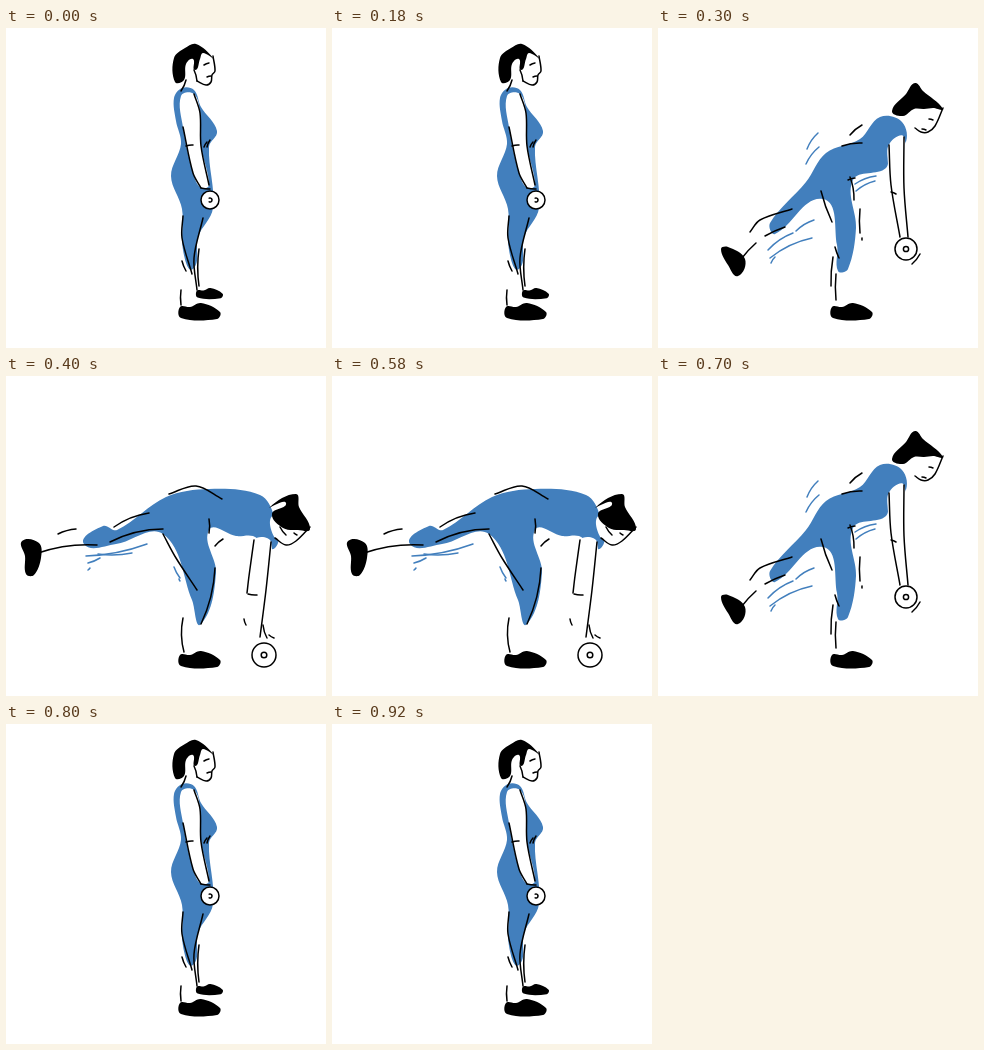
Animation of 320 by 320 pixels, one loop 1000 ms. Source, as an HTML page with a canvas:

```html
<!DOCTYPE html>
<html lang="en">
<head>
<meta charset="utf-8">
<title>Single-leg deadlift</title>
<style>
html, body { margin: 0; width: 100%; height: 100%; overflow: hidden; background: #fff; }
canvas { display: block; width: 100vmin; height: 100vmin; }
</style>
</head>
<body>
<canvas id="stage"></canvas>
<script>
const SIZE = 320, LOOP = 1000;
const BLUE = '#427fbd', INK = '#000', PAPER = '#fff';
const canvas = document.getElementById('stage');
const ctx = canvas.getContext('2d');

const pairs = a => a.flatMap((v, i) => i % 2 ? [] : [[v, a[i + 1]]]);

// Smooth curve through points; handles scale with each segment's length.
function trace(pts, closed) {
  const n = pts.length;
  const at = i => closed ? pts[(i + n) % n] : pts[Math.max(0, Math.min(n - 1, i))];
  const dir = i => {
    const [ax, ay] = at(i - 1), [bx, by] = at(i + 1);
    const len = Math.hypot(bx - ax, by - ay) || 1;
    return [(bx - ax) / len, (by - ay) / len];
  };
  ctx.beginPath();
  ctx.moveTo(...pts[0]);
  for (let i = 0; i < (closed ? n : n - 1); i++) {
    const [x, y] = at(i), [u, v] = at(i + 1);
    const [dx, dy] = dir(i), [ex, ey] = dir(i + 1);
    const k = Math.hypot(u - x, v - y) / 3;
    ctx.bezierCurveTo(x + dx * k, y + dy * k, u - ex * k, v - ey * k, u, v);
  }
}

function blob(color, ...xy) {
  trace(pairs(xy), true);
  ctx.fillStyle = color;
  ctx.fill();
}

function line(...xy) {
  trace(pairs(xy));
  ctx.strokeStyle = INK;
  ctx.stroke();
}

// Separate short strokes, four values each, bowed by a share of their length.
function marks(color, bend, ...xy) {
  ctx.strokeStyle = color;
  for (let i = 0; i < xy.length; i += 4) {
    const [x, y, u, v] = xy.slice(i, i + 4);
    ctx.beginPath();
    ctx.moveTo(x, y);
    ctx.quadraticCurveTo((x + u) / 2 + (v - y) * bend, (y + v) / 2 - (u - x) * bend, u, v);
    ctx.stroke();
  }
}

function limb(left, right, skip = 0) {
  const l = pairs(left), r = pairs(right);
  ctx.fillStyle = PAPER;
  trace([...l, ...r.slice().reverse()], true);
  ctx.fill();
  ctx.strokeStyle = INK;
  for (const side of [l.slice(skip), r]) {
    trace(side);
    ctx.stroke();
  }
}

function ring(x, y, r) {
  ctx.beginPath();
  ctx.arc(x, y, r, 0, Math.PI * 2);
  ctx.fillStyle = PAPER;
  ctx.fill();
  ctx.strokeStyle = INK;
  ctx.stroke();
}

function shoe(x, y, scale = 1) {
  ctx.save();
  ctx.translate(x, y);
  ctx.scale(scale, scale);
  blob(INK, 0, 4, 1, 15, 37, 16, 40, 9, 21, 0, 10, 4);
  ctx.restore();
}

function standing() {
  blob(BLUE, 176, 60, 168, 70, 170, 93, 175, 116, 165, 148, 176, 181, 177, 222, 187, 241,
    192, 209, 207, 180, 203, 119, 211, 103, 195, 79, 188, 62);
  limb([175, 68, 177, 99, 187, 145, 195, 160], [188, 66, 194, 85, 195, 118, 203, 157], 1);
  blob(INK, 207, 30, 190, 16, 179, 20, 168, 30, 169, 54, 178, 52, 180, 36, 187, 31,
    189, 42, 194, 31, 197, 25);
  line(207, 28, 209, 43, 206, 47, 205, 54, 200, 57, 191, 53);
  marks(INK, 0.1, 180, 52, 175, 63, 188, 42, 191, 53, 198, 37, 203, 35, 201, 49, 205, 48,
    180, 118, 187, 117, 198, 119, 201, 114, 201, 119, 204, 112);
  ring(204, 172, 9);
  ctx.beginPath();
  ctx.arc(204, 172, 2, -2, 2);
  ctx.stroke();
  line(177, 188, 176, 210, 186, 246);
  line(197, 190, 188, 230, 191, 262);
  marks(INK, -0.07, 193, 221, 193, 258, 176, 233, 180, 243, 175, 262, 175, 277, 195, 160, 204, 161);
  shoe(191, 260, 0.64);
  shoe(174, 275);
}

function leaning() {
  blob(BLUE, 222, 89, 202, 111, 168, 125, 148, 154, 112, 195, 117, 206, 165, 171, 179, 217,
    180, 243, 190, 241, 198, 200, 195, 152, 228, 140, 231, 117, 247, 116, 244, 94);
  limb([231, 117, 233, 157, 242, 209], [246, 109, 246, 160, 250, 209]);
  blob(INK, 234, 83, 248, 66, 257, 55, 265, 63, 285, 81, 275, 80, 266, 81, 256, 81, 245, 88);
  line(285, 80, 277, 98, 270, 104, 263, 104, 257, 100);
  marks(INK, 0.1, 271, 91, 275, 92, 264, 101, 268, 102, 233, 164, 238, 166,
    262, 226, 254, 236, 192, 107, 204, 97, 184, 118, 204, 115, 192, 149, 196, 172, 190, 152, 197, 150);
  ring(248, 221, 11);
  ring(248, 221, 2.6);
  line(134, 181, 102, 192, 92, 204);
  marks(INK, -0.05, 163, 163, 174, 194, 177, 219, 181, 230, 202, 181, 202, 205, 204, 210, 204, 212,
    127, 199, 107, 208, 98, 215, 84, 230, 175, 229, 173, 258, 178, 246, 178, 272);
  blob(INK, 63, 221, 70, 219, 87, 231, 80, 248, 70, 237);
  shoe(174, 275);
  marks(BLUE, 0.12, 149, 121, 160, 105, 148, 136, 161, 119, 197, 156, 218, 148,
    198, 163, 217, 153, 110, 222, 135, 205, 112, 230, 154, 210, 138, 203, 156, 192, 113, 235, 117, 229);
}

function hinged() {
  blob(BLUE, 78, 168, 97, 150, 111, 154, 160, 121, 203, 113, 254, 119, 268, 140, 269, 172,
    247, 160, 230, 160, 203, 154, 210, 197, 195, 248, 186, 224, 157, 158, 110, 168);
  limb([248, 164, 243, 200, 241, 217], [265, 166, 260, 214, 254, 261]);
  blob(PAPER, 268, 139, 269, 162, 286, 165, 304, 150);
  blob(INK, 264, 131, 290, 118, 293, 131, 304, 153, 292, 154, 277, 152, 266, 138, 280, 127);
  line(304, 151, 290, 165, 280, 169, 269, 162);
  marks(INK, -0.1, 274, 151, 280, 159, 288, 157, 291, 159, 242, 218, 251, 219,
    238, 243, 240, 249, 257, 249, 261, 262, 263, 259, 268, 262);
  ring(258, 279, 12);
  ring(258, 279, 2.8);
  line(163, 118, 190, 110, 216, 123);
  line(157, 158, 170, 182, 191, 214);
  marks(INK, 0.1, 32, 177, 91, 169, 52, 158, 70, 153, 209, 192, 195, 248,
    203, 143, 203, 157, 209, 170, 217, 163);
  marks(INK, -0.12, 143, 137, 108, 151, 157, 153, 104, 166, 177, 242, 178, 276);
  blob(INK, 16, 165, 33, 167, 35, 182, 28, 199, 20, 198, 19, 180);
  shoe(174, 275);
  marks(BLUE, -0.08, 80, 180, 141, 168, 92, 178, 126, 177, 82, 187, 94, 182,
    82, 194, 84, 192, 168, 191, 174, 202, 173, 203, 174, 205);
}

function poseAt(t) {
  if (t < 300 || t >= 800) return standing;
  return t < 400 || t >= 700 ? leaning : hinged;
}

function resize() {
  const side = Math.min(innerWidth, innerHeight) || SIZE;
  canvas.width = canvas.height = Math.round(side * (devicePixelRatio || 1));
}

function tick() {
  const scale = canvas.width / SIZE;
  ctx.setTransform(scale, 0, 0, scale, 0, 0);
  ctx.lineCap = ctx.lineJoin = 'round';
  ctx.lineWidth = 1.5;
  ctx.fillStyle = PAPER;
  ctx.fillRect(0, 0, SIZE, SIZE);
  poseAt(performance.now() % LOOP)();
  requestAnimationFrame(tick);
}

addEventListener('resize', resize);
resize();
tick();
</script>
</body>
</html>
```
